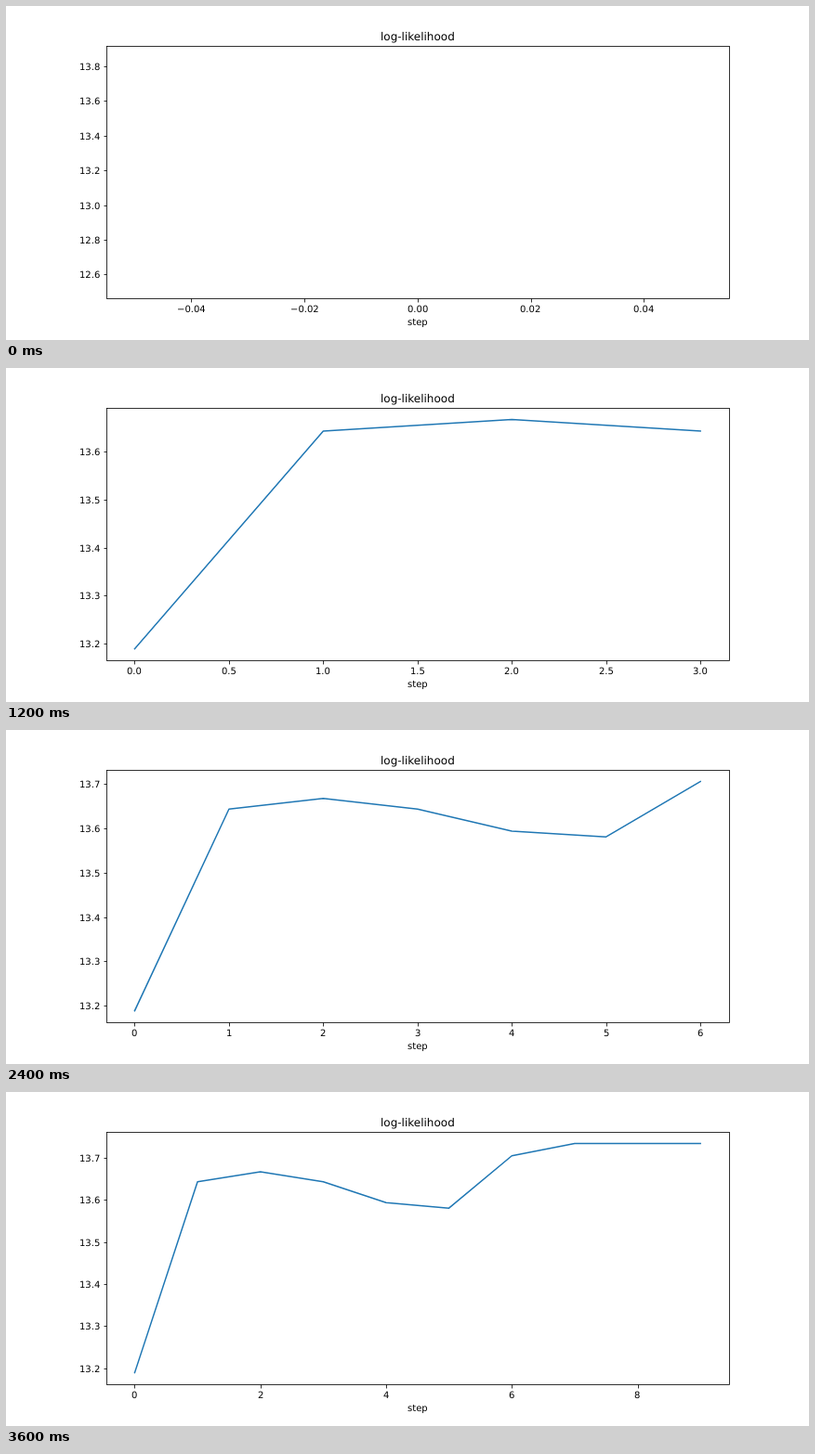
Write an HTML page with a canvas that moves like this. It is 864x360 px and loops after 4000 ms.

```html
<!DOCTYPE html>
<html lang="en">
<head>
<meta charset="utf-8">
<title>log-likelihood</title>
<style>
  html, body { margin: 0; width: 100%; height: 100%; overflow: hidden; background: #fff; }
  canvas { display: block; }
</style>
</head>
<body>
<canvas id="stage" width="864" height="360"></canvas>
<script>
const ctx = document.getElementById('stage').getContext('2d');
const values = [13.189, 13.643, 13.667, 13.643, 13.5935, 13.5805, 13.705, 13.734, 13.734, 13.734];
const stepMs = 400;
const left = 108, right = 777.6, top_ = 43.2, bottom = 315;
const snap = v => Math.floor(v + 0.5) + 0.5;

// Data limits with a 5% margin; a single value is widened first.
function limits(lo, hi) {
  if (lo === hi) {
    const pad = 0.05 * (Math.abs(lo) || 1);
    lo -= pad;
    hi += pad;
  }
  const margin = (hi - lo) * 0.05;
  return [lo - margin, hi + margin];
}

// At most nine intervals of a round size.
function ticks([lo, hi]) {
  const raw = (hi - lo) / 9;
  const mag = 10 ** Math.floor(Math.log10(raw));
  const step = +([1, 2, 2.5, 5, 10].find(s => s * mag >= raw) * mag).toPrecision(3);
  const digits = (String(step).split('.')[1] || '').length;
  const list = [];
  for (let i = Math.ceil(lo / step); i * step <= hi; i++) {
    const value = i * step;
    list.push({ value, label: (value < 0 ? '\u2212' : '') + Math.abs(value).toFixed(digits) });
  }
  return list;
}

function text(str, x, y, size, align) {
  ctx.font = `${size}px "DejaVu Sans", sans-serif`;
  const start = x - ctx.measureText(str).width * align;
  ctx.fillText(str, Math.round(start), y);
}

function stroke(points, color, width, cap) {
  ctx.strokeStyle = color;
  ctx.lineWidth = width;
  ctx.lineCap = cap;
  ctx.lineJoin = 'round';
  ctx.beginPath();
  for (const [x, y] of points) ctx.lineTo(x, y);
  ctx.stroke();
}

function draw(count) {
  const shown = values.slice(0, count);
  const xLim = limits(0, count - 1);
  const yLim = limits(Math.min(...shown), Math.max(...shown));
  const px = v => left + (v - xLim[0]) / (xLim[1] - xLim[0]) * (right - left);
  const py = v => bottom - (v - yLim[0]) / (yLim[1] - yLim[0]) * (bottom - top_);

  ctx.fillStyle = '#fff';
  ctx.fillRect(0, 0, 864, 360);
  ctx.fillStyle = '#000';
  ctx.textRendering = 'geometricPrecision';

  for (const { value, label } of ticks(xLim)) {
    const x = snap(px(value));
    stroke([[x, 315.5], [x, 319.5]], '#000', 0.8, 'butt');
    text(label, px(value), 330, 10, 0.5);
  }
  for (const { value, label } of ticks(yLim)) {
    const y = snap(py(value));
    stroke([[105.5, y], [108.5, y]], '#000', 0.8, 'butt');
    text(label, 101, y + 3.5, 10, 1);
  }

  if (count > 1) stroke(shown.map((v, i) => [px(i), py(v)]), '#1f77b4', 1.5, 'square');

  ctx.strokeStyle = '#000';
  ctx.lineWidth = 0.8;
  ctx.lineJoin = 'miter';
  ctx.strokeRect(snap(left), snap(top_), snap(right) - snap(left), snap(bottom) - snap(top_));

  const middle = (left + right) / 2;
  text('log-likelihood', middle, 37, 12, 0.5);
  text('step', middle, 344, 10, 0.5);
}

function frame() {
  draw(Math.floor(performance.now() / stepMs) % values.length + 1);
  requestAnimationFrame(frame);
}
frame();
</script>
</body>
</html>
```
